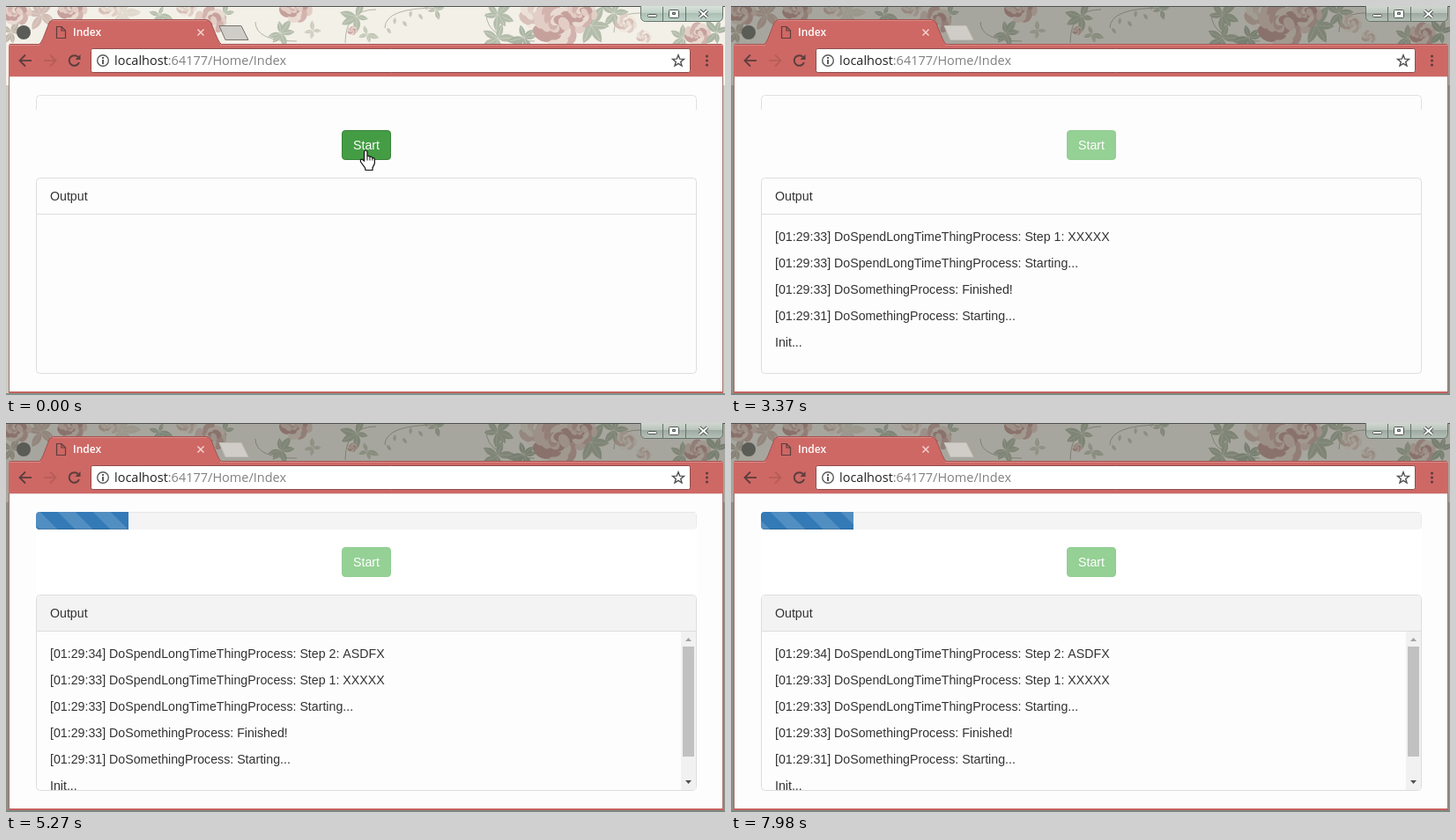
An HTML page with a canvas for the animation above (8 s loop, 816x442 px).

```html
<!DOCTYPE html>
<html lang="en">
<head>
<meta charset="utf-8">
<title>Progress demo</title>
<style>
html, body { margin: 0; width: 816px; height: 442px; overflow: hidden; background: #fff; }
canvas { display: block; }
</style>
</head>
<body>
<canvas id="stage" width="816" height="442"></canvas>
<script>
const LOOP = 8000;
const STEPS = [0, 1270, 1390, 1790, 1910, 3370, 3490, 3640, 3760, 3910, 4030, 4180, 4300, 4430,
  4580, 4730, 4880, 5000, 5120, 5270, 5390, 5510, 5660, 5780, 5900, 6020, 6170, 6330, 6480, 6600,
  6750, 6900, 7050, 7170, 7290, 7440, 7560, 7710, 7830, 7980];
const CLICK = 1270, FIRST_LOG = 1390, LEAVE = 1790, GONE = 1910, NEXT_LOG = 3370, OVERFLOW = 4430;
const LOG = [
  'Init...',
  '[01:29:31] DoSomethingProcess: Starting...',
  '[01:29:33] DoSomethingProcess: Finished!',
  '[01:29:33] DoSpendLongTimeThingProcess: Starting...',
  '[01:29:33] DoSpendLongTimeThingProcess: Step 1: XXXXX',
  '[01:29:34] DoSpendLongTimeThingProcess: Step 2: ASDFX'
];
const BODY = '14.2px "Liberation Sans", Arial, sans-serif';
const UI = '"Open Sans", "Noto Sans", sans-serif';
const RED = '#ce6865', INK = '#5c3e3d';

const stage = document.getElementById('stage');
let g = stage.getContext('2d');

function rect(x, y, w, h, color) {
  g.fillStyle = color;
  g.fillRect(x, y, w, h);
}

function paint(fill, stroke, width = 1) {
  if (fill) { g.fillStyle = fill; g.fill(); }
  if (stroke) { g.strokeStyle = stroke; g.lineWidth = width; g.stroke(); }
}

function box(x, y, w, h, r, fill, stroke) {
  g.beginPath();
  g.roundRect(x, y, w, h, r);
  paint(fill, stroke);
}

function poly(points, fill, stroke, width, open) {
  g.beginPath();
  points.forEach(([x, y]) => g.lineTo(x, y));
  if (!open) g.closePath();
  paint(fill, stroke, width);
}

function line(points, color, width) {
  poly(points, null, color, width, true);
}

function disc(x, y, r, fill, stroke, width) {
  g.beginPath();
  g.arc(x, y, r, 0, 7);
  paint(fill, stroke, width);
}

function text(str, x, y, color, font) {
  g.font = font;
  g.fillStyle = color;
  g.fillText(str, x, y);
}

// ---------- Wallpaper ----------
let seed = 7;
function rnd(a, b) {
  seed = (seed * 16807) % 2147483647;
  return a + (b - a) * seed / 2147483647;
}

function leaf(x, y, len, angle, color) {
  g.save();
  g.translate(x, y);
  g.rotate(angle);
  g.beginPath();
  g.moveTo(0, 0);
  g.quadraticCurveTo(len * .45, -len * .46, len, 0);
  g.quadraticCurveTo(len * .5, len * .4, 0, 0);
  paint(color);
  line([[0, 0], [len * .85, 0]], 'rgba(240,238,226,.5)', .7);
  g.restore();
}

function sprig(x, y, n, len, color = '#b4bdab') {
  for (let i = 0; i < n; i++) leaf(x, y, len * rnd(.7, 1.1), i * 6.28 / n + rnd(-.4, .4), color);
}

function rose(x, y, r, deep) {
  const tones = deep ? ['#e3cec6', '#d3b3ad', '#e9dbd2', '#c6a19c'] : ['#ebe1d7', '#e0cfc6', '#f1e9e0', '#d8c0b8'];
  for (let ring = 0; ring < 3; ring++) {
    const d = r * (.68 - ring * .24);
    for (let i = 0; i < 7; i++) {
      const a = i * .9 + ring * .4 + rnd(-.2, .2);
      g.beginPath();
      g.ellipse(x + d * Math.cos(a), y + d * Math.sin(a) * .85, r * (.38 - ring * .06), r * (.26 - ring * .04), a + 1.2, 0, 7);
      paint(tones[(i + ring) % 4]);
    }
  }
}

function wallpaper() {
  const c = document.createElement('canvas');
  c.width = 816;
  c.height = 90;
  const screen = g;
  g = c.getContext('2d');
  rect(0, 0, 816, 90, '#f3f0e8');

  const stems = [[283, 18, 330, 40], [385, 42, 420, 4], [430, 25, 490, 2], [545, 8, 600, 40], [690, 30, 720, 8]];
  for (const [x, y, u, v] of stems) {
    g.beginPath();
    g.moveTo(x, y);
    g.quadraticCurveTo(x, v, u, v);
    paint(null, '#b3b5a5', 1);
  }
  sprig(40, 10, 6, 20, '#d2bdb4');
  sprig(6, 30, 5, 15, '#c2b9ac');
  rose(12, 7, 18, true);
  rose(75, 4, 18, true);
  sprig(132, 8, 6, 20, '#e0d8cc');
  rose(117, 2, 13, false);
  sprig(174, 10, 5, 15);
  rose(205, 2, 12, false);
  sprig(248, 9, 4, 14);
  rose(232, 16, 19, true);
  sprig(312, 31, 6, 17);
  rose(329, 2, 20, true);
  sprig(348, 28, 4, 12, '#c9cbbc');
  sprig(398, 12, 5, 18);
  sprig(410, 32, 4, 14, '#c0c6b5');
  rose(393, 28, 6, true);
  for (let i = 0; i < 6; i++) leaf(432 + i * 9, 25 - i * 4, 8, i % 2 ? -1.5 : .9, '#bec3b3');
  sprig(488, 4, 4, 13);
  sprig(558, 10, 6, 22);
  sprig(558, 37, 5, 20);
  sprig(664, 22, 7, 23);
  sprig(588, 36, 6, 19, '#a9b4a3');
  rose(605, 8, 24, false);
  rose(627, 21, 32, true);
  rose(653, 8, 19, true);
  sprig(690, 8, 5, 17);
  rose(704, 20, 13, false);
  rose(724, 35, 9, false);
  sprig(768, 36, 5, 17);
  rose(785, 32, 16, true);
  sprig(806, 30, 5, 17, '#a9b4a3');
  g = screen;
  return c;
}
const flowers = wallpaper();

// ---------- Browser window ----------
function backdrop(dim) {
  rect(0, 0, 816, 442, '#c9cbc2');
  g.drawImage(flowers, 0, 0);
  if (dim) rect(0, 0, 816, 442, 'rgba(22,26,16,.34)');
  rect(0, 0, 816, 1, '#4e5450');
  rect(0, 440, 816, 2, dim ? '#7b8881' : '#7f918b');
}

function captionButtons(dim) {
  const fill = g.createLinearGradient(0, 0, 0, 17);
  fill.addColorStop(0, dim ? '#d1d7d0' : '#d7e2da');
  fill.addColorStop(.45, dim ? '#bac5bc' : '#c3d2c8');
  fill.addColorStop(.5, dim ? '#9eaaa1' : '#abc0b4');
  fill.addColorStop(1, dim ? '#b5c0b7' : '#c0d2c7');
  box(720.5, -4.5, 93, 22, 5, fill, '#64736b');
  rect(745, 1, 1, 16, '#64736b');
  rect(771, 1, 1, 16, '#64736b');
  box(728.5, 9.5, 10, 3, 1, '#fff', '#4c5551');
  box(752.5, 4.5, 11, 9, 1, '#fff', '#4c5551');
  box(756.5, 7.5, 3, 2, 0, '#a9b9b0', '#4c5551');
  for (const [color, width] of [['#4c5551', 4], ['#fff', 2]]) {
    line([[787, 5], [796, 13]], color, width);
    line([[796, 5], [787, 13]], color, width);
  }
}

function arrow(x, dir, color) {
  line([[x - 7 * dir, 62], [x + 7 * dir, 62]], color, 1.8);
  line([[x, 55.5], [x - 6.5 * dir, 62], [x, 68.5]], color, 1.8);
}

function tabs(dim) {
  disc(20, 30, 8, dim ? '#5a5c56' : '#5b5b57');
  poly([[242, 22.5], [267, 22.5], [275, 38.5], [249, 38.5]], dim ? '#d0cdc8' : '#cfcdc8', dim ? '#c1beb8' : '#77736f');
  g.beginPath();
  g.moveTo(37, 44);
  g.quadraticCurveTo(40, 42, 42, 37);
  g.lineTo(49, 19);
  g.quadraticCurveTo(50.5, 15.5, 54, 15.5);
  g.lineTo(227, 15.5);
  g.quadraticCurveTo(231, 15.5, 232.5, 19);
  g.lineTo(240, 37);
  g.quadraticCurveTo(242, 42, 245, 44);
  paint(RED, '#a05351');
  line([[53, 16.5], [228, 16.5]], '#dc8a86', 1);
  poly([[57.5, 23.5], [63, 23.5], [67.5, 28], [67.5, 36.5], [57.5, 36.5]], null, INK, 1.2);
  line([[63, 24], [63, 28], [67, 28]], INK, 1.2);
  text('Index', 76, 34, '#fff', '600 12px ' + UI);
  line([[217.5, 26.5], [224.5, 33.5]], '#f2d3d1', 1.5);
  line([[224.5, 26.5], [217.5, 33.5]], '#f2d3d1', 1.5);
}

function toolbar() {
  box(3, 43, 811, 37, [3, 3, 0, 0], RED);
  rect(4, 43, 34, 1, '#a05351');
  rect(244, 43, 568, 1, '#a05351');
  rect(4, 44, 35, 1, '#dc8a86');
  rect(243, 44, 570, 1, '#dc8a86');
  arrow(22, 1, INK);
  arrow(50, -1, '#b65d5a');
  g.beginPath();
  g.arc(77.5, 62, 5.8, .35, 5.5);
  paint(null, INK, 2);
  poly([[84.5, 55], [84.5, 61], [78.5, 61]], INK);

  box(96.5, 48.5, 680, 27, 2, '#fff', '#8e4d4b');
  disc(110, 62, 6.3, null, '#5a5a5a', 1.4);
  rect(109, 61, 2, 5, '#5a5a5a');
  rect(109, 58, 2, 2, '#5a5a5a');
  const url = '14.5px ' + UI;
  text('localhost', 123, 67, '#222', url);
  text(':64177/Home/Index', 123 + g.measureText('localhost').width, 67, '#808080', url);
  const star = [];
  for (let i = 0; i < 10; i++) {
    const a = i * Math.PI / 5 - Math.PI / 2, r = i % 2 ? 2.9 : 6.8;
    star.push([763 + r * Math.cos(a), 62.5 + r * Math.sin(a)]);
  }
  poly(star, null, '#4f4f4f', 1.4);
  for (const y of [57, 62, 67]) disc(795.5, y, 1.6, INK);
}

function browser(dim) {
  backdrop(dim);
  captionButtons(dim);
  tabs(dim);
  rect(3, 80, 811, 360, '#a0706c');
  rect(3, 438, 811, 2, '#c4625f');
  rect(4, 80, 809, 358, '#fdfdfd');
  rect(4, 80, 809, 1, '#ecd9d8');
  toolbar();
}

// ---------- Page ----------
function ease(p) {
  if (p <= 0) return 0;
  if (p >= 1) return 1;
  const bez = (u, a, b) => 3 * u * (1 - u) * (1 - u) * a + 3 * u * u * (1 - u) * b + u * u * u;
  let lo = 0, hi = 1;
  for (let i = 0; i < 20; i++) {
    const mid = (lo + hi) / 2;
    if (bez(mid, .25, .25) < p) lo = mid; else hi = mid;
  }
  return bez(lo, .1, 1);
}

function progress(t) {
  if (t >= OVERFLOW) {
    box(34, 101, 750, 20, 4, '#f4f4f4');
    line([[36, 101.5], [782, 101.5]], '#e7e7e7', 1);
    line([[783.5, 104], [783.5, 118]], '#ebebeb', 1);
  } else {
    g.save();
    g.beginPath();
    g.rect(34, 101, 750, 17);
    g.clip();
    box(34.5, 101.5, 749, 30, 4, null, '#e0e0e0');
    g.restore();
  }

  if (t <= NEXT_LOG) return;
  const w = 105 * ease((t - 3360) / 600);
  g.save();
  g.beginPath();
  g.roundRect(34, 101, w, 20, [4, 0, 0, 4]);
  g.clip();
  rect(34, 101, w, 20, '#337ab7');
  // Stripes slide left by one 40px tile every two seconds
  const shift = 40 - (t - 2505) / 50 % 40;
  for (let x = 34 + shift - 80; x < 140; x += 40) {
    poly([[x, 101], [x + 20, 101], [x + 40, 121], [x + 20, 121]], 'rgba(255,255,255,.15)');
  }
  rect(34, 120, w, 1, 'rgba(0,0,0,.15)');
  g.restore();
}

function button(on) {
  box(381.5, 141.5, 55, 33, 3.5, on ? '#449d44' : '#95d095', on ? '#398439' : '#92cd92');
  text('Start', 394, 163, '#fff', BODY);
}

function scrollbar() {
  rect(766, 237, 17, 180, '#f1f1f1');
  rect(768, 254, 13, 125, '#c1c1c1');
  poly([[771, 248], [778, 248], [774.5, 244]], '#a3a3a3');
  poly([[771, 406], [778, 406], [774.5, 410]], '#505050');
}

function panel(t) {
  const full = t >= OVERFLOW;
  const count = full ? 6 : t >= NEXT_LOG ? 5 : t >= FIRST_LOG ? 2 : 0;
  box(34.5, 195.5, 749, 222, 4, '#fdfdfd', '#ddd');
  if (full) box(35, 196, 748, 40, [3, 3, 0, 0], '#f3f3f3');
  rect(35, 236, 748, 1, '#ddd');
  text('Output', 50, 221, '#333', BODY);
  g.save();
  g.beginPath();
  g.rect(35, 237, 748, 180);
  g.clip();
  for (let i = 0; i < count; i++) text(LOG[count - 1 - i], 50, 267 + 30 * i, '#333', BODY);
  if (full) scrollbar();
  g.restore();
}

function hand() {
  g.beginPath();
  g.moveTo(406.5, 176);
  g.lineTo(406.5, 165.5);
  g.quadraticCurveTo(408.2, 162.5, 410, 165.5);
  g.lineTo(410, 171);
  g.quadraticCurveTo(412, 169.5, 413, 171.5);
  g.quadraticCurveTo(415, 170.5, 415.8, 172.7);
  g.quadraticCurveTo(418, 172, 418.4, 174.5);
  g.lineTo(418.3, 179);
  g.lineTo(416, 184);
  g.lineTo(416, 186.5);
  g.lineTo(408, 186.5);
  g.lineTo(407.5, 184);
  g.lineTo(402.5, 177);
  g.quadraticCurveTo(401.8, 174, 404, 174);
  g.closePath();
  paint('#fff', '#111', 1.2);
  for (const x of [410, 413, 415.8]) line([[x, 172], [x, 175.5]], '#111', 1);
}

function cursor(t) {
  if (t < CLICK) {
    hand();
  } else if (t < LEAVE) {
    disc(407, 163, 8.2, '#fff');
    disc(407, 163, 6.6, '#fff', '#cc0a14', 2.2);
    line([[402.4, 158.4], [411.6, 167.6]], '#cc0a14', 2.4);
  } else if (t < GONE) {
    poly([[485.5, 165.5], [485.5, 181], [489, 177.8], [491.5, 184], [494, 183], [491.5, 177], [496.3, 177]], '#fff', '#111');
  }
}

function draw(t) {
  const clicked = t >= CLICK;
  browser(clicked);
  if (t >= OVERFLOW) rect(34, 101, 750, 317, '#fff');
  progress(t);
  button(!clicked);
  panel(t);
  cursor(t);
}

const start = performance.now();
function tick() {
  const now = (performance.now() - start) % LOOP;
  draw(STEPS.findLast(s => s <= now));
  requestAnimationFrame(tick);
}
tick();
</script>
</body>
</html>
```
